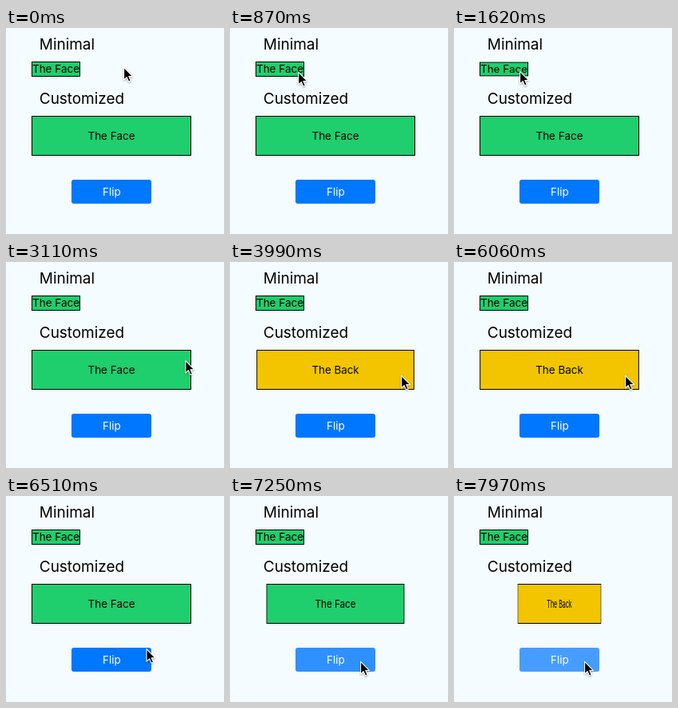
An HTML page that plays this animation: 273 by 258 pixels, repeating every 8000 ms.

```html
<!DOCTYPE html>
<html lang="en">
<head>
<meta charset="utf-8">
<title>Flip cards</title>
<style>
  html, body { margin: 0; width: 100%; height: 100%; overflow: hidden; background: #f5fcff; }
  svg { display: block; width: 273px; height: 258px; }
  text { font: 13.5px Inter, Roboto, sans-serif; }
  .title { font-size: 19px; letter-spacing: -0.05px; }
  .card text, .button text { text-anchor: middle; }
  .card rect { stroke: #000; }
  .button rect { fill: #0077ff; }
  .button text { fill: #fff; }
  #cursor { filter: drop-shadow(0 1px 1px rgba(0, 0, 0, .35)); }
</style>
</head>
<body>
<svg viewBox="0 0 273 258">
  <rect width="273" height="258" fill="#f5fcff"/>
  <text class="title" x="41.8" y="27">Minimal</text>
  <text class="title" x="41.8" y="95">Customized</text>

  <g class="card" id="minimal">
    <rect x="-30" y="-9" width="60" height="18"/>
    <text y="4.8"></text>
  </g>
  <g class="card" id="custom">
    <rect x="-99.5" y="-24.5" width="199" height="49"/>
    <text y="5"></text>
  </g>

  <g class="button" id="button">
    <rect x="82" y="190" width="100" height="30" rx="3"/>
    <text x="132.3" y="210">Flip</text>
  </g>

  <path id="cursor" d="M0.6 1.4V17L4.2 13.6L6.6 19.2L9.2 18.1L6.8 12.6H11.6Z"
        fill="#000" stroke="#fff" stroke-width="1.1" stroke-linejoin="round"/>
</svg>
<script>
  const LOOP = 8000;
  const TICK = 147.7; // the screen refreshes in steps of this length
  const LEAD = 10;

  const byId = id => document.getElementById(id);
  const cards = [
    { el: byId('minimal'), x: 62.5, y: 51.5, vertical: true, flips: [870, 1469, 2330, 2912] },
    { el: byId('custom'), x: 132, y: 135, vertical: false, flips: [3815, 4550, 5290, 6042, 7193, 7909] }
  ];
  const presses = [7193, 7909];

  // time, x, y
  const route = [
    [0, 147, 48], [740, 85, 54], [1300, 85, 54], [1620, 82, 53],
    [2955, 82, 53], [3100, 224, 122], [3250, 246, 135], [3400, 248, 139],
    [3690, 214, 141], [6060, 214, 141], [6640, 163, 206], [LOOP, 163, 206]
  ];

  // Underdamped spring from 0 to 1
  function spring(ms) {
    if (ms <= 0) return 0;
    const t = ms / 1000, decay = 9.5, freq = 11.83;
    return 1 - Math.exp(-decay * t) *
      (Math.cos(freq * t) + decay / freq * Math.sin(freq * t));
  }

  function drawCard({ el, x, y, vertical, flips }, t) {
    const turns = flips.reduce((sum, start) => sum + spring(t - start), 0);
    const facing = Math.cos(Math.PI * turns);
    const size = Math.abs(facing);
    const scale = vertical ? `1 ${size}` : `${size} 1`;
    el.setAttribute('transform', `translate(${x} ${y}) scale(${scale})`);
    el.querySelector('rect').setAttribute('fill', facing < 0 ? '#f2c500' : '#1fce6d');
    el.querySelector('text').textContent = facing < 0 ? 'The Back' : 'The Face';
  }

  function buttonOpacity(t) {
    const start = presses.filter(p => p <= t).pop();
    if (start === undefined) return 1;
    const age = t - start;
    const dim = age < 150 ? age / 150 : Math.max(0, 1 - (age - 150) / 250);
    return 1 - 0.66 * dim;
  }

  function cursorAt(t) {
    const i = Math.max(1, route.findIndex(p => p[0] >= t));
    const [t0, x0, y0] = route[i - 1], [t1, x1, y1] = route[i];
    const k = (t - t0) / (t1 - t0);
    return [x0 + (x1 - x0) * k, y0 + (y1 - y0) * k];
  }

  function draw(now) {
    const t = Math.floor((now % LOOP + LEAD) / TICK) * TICK;
    cards.forEach(card => drawCard(card, t));
    byId('button').setAttribute('opacity', buttonOpacity(t));
    byId('cursor').setAttribute('transform', `translate(${cursorAt(t).join(' ')})`);
  }

  const begin = performance.now();
  function loop() {
    draw(performance.now() - begin);
    requestAnimationFrame(loop);
  }
  loop();
</script>
</body>
</html>
```
